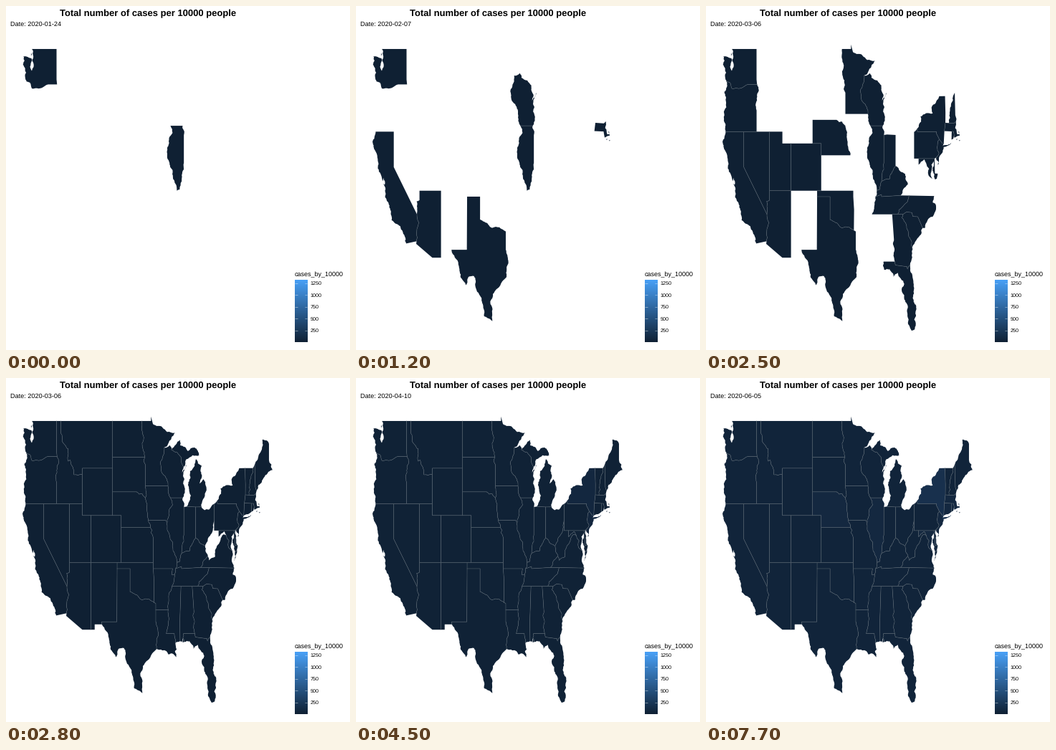
Animation, 480 px wide and 480 px high, one loop 8 s. Source, as a matplotlib script:

```python
import numpy as np
import matplotlib.pyplot as plt
from matplotlib.animation import FuncAnimation
from matplotlib.patches import PathPatch
from matplotlib.path import Path

SIZE, DPI = 480, 72  # at 72 dpi one point is one pixel
FRAMES, STEP = 80, 100
FONT = "Liberation Sans"

LOW = np.array([15, 32, 51]) / 255
WARM = np.array([24, 48, 77]) / 255
HIGH = np.array([72, 160, 247]) / 255
BORDER = "#4c5a66"

rng = np.random.default_rng(3)
edges = []


def project(west, north):
    """Plain longitude and latitude to the pixel plane, as x + iy."""
    return complex(775.1 - 6.02 * west, 867.5 - 16.48 * north)


def fray(a, b, rough):
    """Points after a up to b, by midpoint displacement."""
    if not rough or abs(b - a) < 3:
        return [b]
    mid = (a + b) / 2 + rough * rng.uniform(-1, 1) * 1j * (b - a)
    return fray(a, mid, rough) + fray(mid, b, rough)


def edge(owners, coords, rough):
    """A stretch of boundary, shared by one or two states."""
    keys = [project(w, n) for w, n in zip(coords[::2], coords[1::2])]
    pts = keys[:1]
    for a, b in zip(keys, keys[1:]):
        pts += fray(a, b, rough)
    edges.append((owners.split(), pts))


def line(owners, *coords):
    edge(owners, coords, 0)


def river(owners, *coords):
    edge(owners, coords, 0.12)


def coast(owners, *coords):
    edge(owners, coords, 0.16)


# West
coast("WA", 124, 46.25, 124.1, 47, 124.7, 48.4, 122.75, 48.15, 123, 47.3,
      122.8, 47.15, 122.35, 47.5, 122.5, 48.5, 122.76, 49)
line("WA", 122.76, 49, 117.04, 49)
for w, n in (122.95, 48.6), (122.6, 48.15):
    line("WA", w, n, w - 0.2, n, w, n - 0.2, w, n)
line("WA ID", 117.04, 49, 117.04, 46.42, 116.92, 46)
river("WA OR", 124, 46.25, 123.2, 46.15, 122.75, 45.65, 121.2, 45.65,
      120.5, 45.7, 119, 46)
line("WA OR", 119, 46, 116.92, 46)
river("OR ID", 116.92, 46, 116.5, 45.5, 117.2, 44.4, 117.03, 43.8)
line("OR ID", 117.03, 43.8, 117.03, 42)
coast("OR", 124, 46.25, 124.1, 44.5, 124.55, 42.85, 124.2, 42)
line("OR CA", 124.2, 42, 120, 42)
line("OR NV", 120, 42, 117.03, 42)
coast("CA", 124.2, 42, 124.4, 40.45, 123.8, 39.8, 123.7, 38.9, 122.5, 37.8,
      122.35, 38.1, 122.1, 37.5, 122.5, 37.6, 121.95, 36.6, 120.65, 35.2,
      120.5, 34.5, 118.5, 34, 117.3, 33, 117.12, 32.53)
line("CA", 117.12, 32.53, 114.72, 32.72)
line("CA NV", 120, 42, 120, 39, 114.63, 35)
river("CA AZ", 114.63, 35, 114.15, 34.3, 114.5, 33.9, 114.72, 32.72)
river("NV AZ", 114.63, 35, 114.7, 36.1, 114.04, 36.2)
line("NV AZ", 114.04, 36.2, 114.04, 37)
line("NV ID", 117.03, 42, 114.04, 42)
line("NV UT", 114.04, 42, 114.04, 37)
line("UT ID", 114.04, 42, 111.05, 42)
line("UT WY", 111.05, 42, 111.05, 41, 109.05, 41)
line("UT CO", 109.05, 41, 109.05, 37)
line("UT AZ", 114.04, 37, 109.05, 37)
line("AZ NM", 109.05, 37, 109.05, 31.33)
line("AZ", 114.72, 32.72, 114.8, 32.5, 111.07, 31.33, 109.05, 31.33)
line("ID", 117.04, 49, 116.05, 49)
line("ID MT", 116.05, 49, 116.05, 48)
river("ID MT", 116.05, 48, 114.7, 46.7, 114.35, 46.65, 114.4, 45.6,
      113.9, 45.7, 113, 44.45, 111.05, 44.5)
line("ID WY", 111.05, 44.5, 111.05, 42)

# Mountains and plains
line("MT", 116.05, 49, 104.05, 49)
line("MT WY", 111.05, 44.5, 111.05, 45, 104.05, 45)
line("MT ND", 104.05, 49, 104.05, 45.94)
line("MT SD", 104.05, 45.94, 104.05, 45)
line("WY SD", 104.05, 45, 104.05, 43)
line("WY NE", 104.05, 43, 104.05, 41)
line("WY CO", 109.05, 41, 104.05, 41)
line("CO NE", 104.05, 41, 102.05, 41, 102.05, 40)
line("CO KS", 102.05, 40, 102.05, 37)
line("CO OK", 103, 37, 102.05, 37)
line("CO NM", 109.05, 37, 103, 37)
line("NM OK", 103, 37, 103, 36.5)
line("NM TX", 103, 36.5, 103.06, 32, 106.62, 32, 106.53, 31.78)
line("NM", 109.05, 31.33, 108.2, 31.33, 108.2, 31.78, 106.53, 31.78)
line("ND", 104.05, 49, 97.23, 49)
line("ND SD", 104.05, 45.94, 96.56, 45.94)
river("ND MN", 97.23, 49, 96.85, 47.5, 96.56, 45.94)
river("SD MN", 96.56, 45.94, 96.85, 45.6, 96.45, 45.3)
line("SD MN", 96.45, 45.3, 96.45, 43.5)
river("SD IA", 96.45, 43.5, 96.45, 42.5)
line("SD NE", 104.05, 43, 98.5, 43)
river("SD NE", 98.5, 43, 97.9, 42.8, 97.2, 42.85, 96.45, 42.5)
river("NE IA", 96.45, 42.5, 96.1, 41.7, 95.77, 40.58)
river("NE MO", 95.77, 40.58, 95.3, 40)
line("NE KS", 102.05, 40, 95.3, 40)
river("KS MO", 95.3, 40, 94.9, 39.75, 95.1, 39.5, 94.62, 39.1)
line("KS MO", 94.62, 39.1, 94.62, 37)
line("KS OK", 102.05, 37, 94.62, 37)
line("OK MO", 94.62, 37, 94.62, 36.5)
line("OK AR", 94.62, 36.5, 94.43, 35.4, 94.48, 33.64)
line("OK TX", 103, 36.5, 100, 36.5, 100, 34.56)
river("OK TX", 100, 34.56, 98.1, 34.13, 97.2, 33.85, 95.5, 33.9, 94.48, 33.64)
line("TX AR", 94.48, 33.64, 94.04, 33.55, 94.04, 33.02)
line("TX LA", 94.04, 33.02, 94.04, 32)
river("TX LA", 94.04, 32, 93.55, 31.2, 93.85, 29.7)
river("TX", 106.53, 31.78, 104.9, 30.6, 104.5, 29.65, 103.2, 29, 102.7, 29.7,
      101.4, 29.77, 100.3, 28.3, 99.5, 27.5, 99.1, 26.4, 97.15, 25.95)
coast("TX", 97.15, 25.95, 97.4, 27.3, 97, 28.1, 94.9, 29.3, 93.85, 29.7)

# Midwest
line("MN", 97.23, 49, 95.15, 49, 95.15, 49.38, 94.7, 48.75)
coast("MN", 94.7, 48.75, 92.5, 48.45, 91.4, 48.07, 89.6, 48, 90.8, 47.35,
      92.1, 46.75)
river("MN WI", 92.1, 46.75, 92.3, 46.1, 92.88, 45.6, 92.75, 44.75,
      91.25, 43.85, 91.22, 43.5)
line("MN IA", 96.45, 43.5, 91.22, 43.5)
river("IA WI", 91.22, 43.5, 91.15, 42.9, 90.64, 42.5)
river("IA IL", 90.64, 42.5, 90.15, 41.9, 91.05, 41.2, 91.42, 40.38)
line("IA MO", 95.77, 40.58, 91.73, 40.6, 91.42, 40.38)
river("MO IL", 91.42, 40.38, 91.4, 39.9, 90.7, 39, 90.15, 38.75, 90.2, 38.4,
      89.5, 37.6, 89.15, 37)
river("MO KY", 89.15, 37, 89.45, 36.5)
river("MO TN", 89.45, 36.5, 89.7, 36)
line("MO AR", 94.62, 36.5, 90.15, 36.5, 90.37, 36, 89.7, 36)
coast("WI", 92.1, 46.75, 90.8, 46.95, 90.42, 46.57)
river("WI MI", 90.42, 46.57, 88.1, 45.9, 87.6, 45.1)
coast("WI", 87.6, 45.1, 88, 44.55, 87, 45.3, 87.7, 43.7, 87.8, 42.5)
line("WI IL", 90.64, 42.5, 87.8, 42.5)
coast("IL", 87.8, 42.5, 87.53, 41.72)
line("IL IN", 87.53, 41.72, 87.53, 39.35)
river("IL IN", 87.53, 39.35, 87.55, 38.8, 88.03, 37.8)
river("IL KY", 89.15, 37, 88.5, 37.1, 88.03, 37.8)
coast("IN", 87.53, 41.72, 86.82, 41.76)
line("IN MI", 86.82, 41.76, 84.81, 41.72)
line("IN OH", 84.81, 41.72, 84.82, 39.1)
river("IN KY", 88.03, 37.8, 86.2, 38, 85.4, 38.7, 84.82, 39.1)
coast("MI", 90.42, 46.57, 88.4, 47.4, 88.4, 46.95, 86.6, 46.45, 85, 46.75,
      84, 46.1, 85.5, 46.1, 87, 45.75, 87.6, 45.1)
coast("MI", 86.82, 41.76, 86.25, 43, 86.5, 43.8, 86.1, 44.75, 84.75, 45.77,
      83.4, 45.2, 83.35, 44.3, 83.9, 43.7, 82.95, 44.07, 82.45, 43,
      83.45, 41.73)
line("MI OH", 84.81, 41.72, 83.45, 41.73)
coast("OH", 83.45, 41.73, 82.7, 41.45, 81.7, 41.5, 80.52, 41.98)
line("OH PA", 80.52, 41.98, 80.52, 40.64)
river("OH WV", 80.52, 40.64, 80.7, 40, 81.7, 39.2, 82.6, 38.42)
river("OH KY", 84.82, 39.1, 83.7, 38.63, 82.6, 38.42)

# South
river("KY WV", 82.6, 38.42, 81.97, 37.54)
river("KY VA", 81.97, 37.54, 83.68, 36.6)
line("KY TN", 83.68, 36.6, 88.07, 36.5, 88.07, 36.68, 89.45, 36.5)
river("TN AR", 89.7, 36, 90.3, 35)
line("TN MS", 90.3, 35, 88.2, 35)
line("TN AL", 88.2, 35, 85.6, 35)
line("TN GA", 85.6, 35, 84.32, 35)
river("TN NC", 84.32, 35, 84, 35.4, 82, 36.1, 81.68, 36.59)
line("TN VA", 83.68, 36.6, 81.68, 36.59)
line("AR LA", 94.04, 33.02, 91.17, 33)
river("AR MS", 91.17, 33, 91.1, 33.6, 90.3, 35)
river("LA MS", 91.17, 33, 91, 32.2, 91.6, 31)
line("LA MS", 91.6, 31, 89.75, 31)
river("LA MS", 89.75, 31, 89.5, 30.2)
coast("LA", 93.85, 29.7, 91.8, 29.55, 91.2, 29.25, 89.9, 29.25, 89.3, 29,
      89.6, 29.5, 89.2, 29.65, 89.5, 30.2)
line("MS AL", 88.2, 35, 88.47, 31.9, 88.4, 30.37)
coast("MS", 89.5, 30.2, 88.4, 30.37)
line("AL GA", 85.6, 35, 85.2, 32.9)
river("AL GA", 85.2, 32.9, 85.05, 32, 85, 31)
line("AL FL", 85, 31, 87.6, 31)
river("AL FL", 87.6, 31, 87.45, 30.3)
coast("AL", 88.4, 30.37, 88.05, 30.3, 88, 30.7, 87.8, 30.25, 87.45, 30.3)
line("GA FL", 85, 31, 84.86, 30.7, 82.2, 30.57)
river("GA FL", 82.2, 30.57, 82.05, 30.37, 81.45, 30.7)
line("GA NC", 84.32, 35, 83.1, 35)
river("GA SC", 83.1, 35, 83.35, 34.7, 81.5, 33, 80.9, 32.03)
coast("GA", 80.9, 32.03, 81.45, 30.7)
coast("FL", 87.45, 30.3, 86.2, 30.35, 85.3, 29.7, 84.3, 30.05, 82.8, 29.1,
      82.8, 27.8, 81.8, 26.1, 81.1, 25.15, 80.4, 25.25, 80.05, 26.9,
      80.55, 28.3, 81.45, 30.7)
line("SC NC", 83.1, 35, 82.3, 35.2, 81.05, 35.15, 80.8, 34.82, 79.67, 34.8,
     78.55, 33.86)
coast("SC", 78.55, 33.86, 79.2, 33.2, 80.9, 32.03)
coast("NC", 75.87, 36.55, 76.2, 36, 75.6, 35.9, 75.6, 35.25, 77.4, 34.5,
      77.95, 33.87, 78.55, 33.86)
line("NC VA", 81.68, 36.59, 75.87, 36.55)
river("VA WV", 81.97, 37.54, 81.7, 37.2, 80.3, 37.5, 79.7, 38.5, 78.35, 39.4,
      77.72, 39.32)
coast("VA", 76.3, 38, 76.3, 37, 75.87, 36.55)
coast("VA", 75.65, 37.95, 75.95, 37.15, 75.24, 38.03)

# Northeast
river("VA MD", 77.72, 39.32, 77.05, 38.85, 77.25, 38.4, 76.3, 38)
line("VA MD", 75.65, 37.95, 75.24, 38.03)
coast("MD", 76.3, 38, 76.5, 39.2, 76, 39.5, 76.25, 38.7, 75.65, 37.95)
coast("MD", 75.24, 38.03, 75.05, 38.45)
river("MD WV", 77.72, 39.32, 78.2, 39.65, 79.48, 39.2)
line("MD WV", 79.48, 39.2, 79.48, 39.72)
line("MD PA", 79.48, 39.72, 75.79, 39.72)
line("MD DE", 75.79, 39.72, 75.7, 38.46, 75.05, 38.45)
line("DE PA", 75.79, 39.72, 75.42, 39.8)
coast("DE", 75.42, 39.8, 75.4, 39, 75.05, 38.45)
line("PA WV", 79.48, 39.72, 80.52, 39.72, 80.52, 40.64)
coast("PA", 80.52, 41.98, 79.76, 42.27)
line("PA NY", 79.76, 42.27, 79.76, 42, 75.35, 42)
river("PA NY", 75.35, 42, 74.7, 41.36)
river("PA NJ", 74.7, 41.36, 75.2, 40.65, 74.75, 40.2, 75.42, 39.8)
coast("NJ", 75.42, 39.8, 74.9, 38.95, 74, 40.2, 73.95, 41)
line("NJ NY", 74.7, 41.36, 73.95, 41)
line("NY", 73.95, 41, 73.95, 40.75, 73.65, 41)
coast("NY", 74, 40.6, 72.5, 40.85, 71.9, 41.07, 73.7, 40.85, 74, 40.6)
coast("NY", 79.76, 42.27, 78.9, 42.85, 79.05, 43.27, 76.2, 43.55, 76.3, 44.2,
      74.7, 45)
line("NY", 74.7, 45, 73.35, 45.01)
line("NY CT", 73.65, 41, 73.5, 42.05)
line("NY MA", 73.5, 42.05, 73.27, 42.75)
line("NY VT", 73.27, 42.75, 73.25, 43.6, 73.35, 45.01)
line("VT", 73.35, 45.01, 71.5, 45.01)
river("VT NH", 71.5, 45.01, 72.3, 43.6, 72.46, 42.73)
line("VT MA", 73.27, 42.75, 72.46, 42.73)
line("NH MA", 72.46, 42.73, 71.3, 42.7, 70.82, 42.87)
line("NH", 71.5, 45.01, 71.1, 45.3)
line("NH", 70.7, 43.07, 70.82, 42.87)
line("NH ME", 71.1, 45.3, 70.97, 43.4, 70.7, 43.07)
river("ME", 71.1, 45.3, 70.4, 45.75, 69.25, 47.45, 68.3, 47.35, 67.8, 47.07)
line("ME", 67.8, 47.07, 67.8, 45.7)
coast("ME", 67.8, 45.7, 67, 44.85, 69, 44.2, 70.2, 43.6, 70.7, 43.07)
coast("MA", 70.82, 42.87, 71, 42.3, 70.5, 41.77, 70, 41.8, 70.2, 42.07,
      69.95, 41.67, 71.12, 41.5)
for w, n in (70.8, 41.35), (70.15, 41.25):
    line("MA", w, n, w - 0.3, n + 0.05, w - 0.2, n - 0.05, w, n)
line("MA CT", 73.5, 42.05, 71.8, 42.02)
line("MA RI", 71.8, 42.02, 71.38, 42.02, 71.12, 41.5)
line("CT RI", 71.8, 42.02, 71.85, 41.32)
coast("CT", 73.65, 41, 71.85, 41.32)
coast("RI", 71.85, 41.32, 71.45, 41.4, 71.4, 41.7, 71.12, 41.5)

# Week in which each state joins; all others join in week 7
FIRST = {s: week for week, names in enumerate([
    "WA IL", "CA AZ", "WI MA", "TX", "NE", "OR UT",
    "MN NV CO OK IN KY TN NC SC GA FL PA NY NJ MD NH RI"])
    for s in names.split()}
FIRST["WV"] = 8

EARLY = {"NY": 0.45, "NJ": 0.4}
LATE = {"NY": 1} | dict.fromkeys("IL NE MA NJ RI CT DE MD".split(), 0.5)


def joins(state):
    return FIRST.get(state, 7)


def vertices(pts):
    return np.column_stack([np.real(pts), np.imag(pts)])


def outline(state):
    """Chain the state's edges into closed rings."""
    todo = [pts for owners, pts in edges if state in owners]
    parts = []
    while todo:
        ring = list(todo.pop(0))
        while ring[0] != ring[-1]:
            i = next(i for i, e in enumerate(todo) if ring[-1] in (e[0], e[-1]))
            e = todo.pop(i)
            ring += e[1:] if e[0] == ring[-1] else e[-2::-1]
        parts.append(Path(vertices(ring), closed=True))
    return Path.make_compound_path(*parts)


plt.rcParams["text.hinting"] = "none"
fig = plt.figure(figsize=(SIZE / DPI, SIZE / DPI), dpi=DPI, facecolor="white")
ax = fig.add_axes([0, 0, 1, 1])

shapes = {}
for s in sorted({s for owners, _ in edges for s in owners}):
    shapes[s] = PathPatch(outline(s), lw=0, snap=False)
    ax.add_patch(shapes[s])

borders = []
for owners, pts in edges:
    if len(owners) == 2:
        stroke, = ax.plot(*vertices(pts).T, color=BORDER, lw=0.6, snap=False)
        borders.append((max(map(joins, owners)), stroke))

# Legend
ramp = np.linspace(1, 0, 256)[:, None, None]
ax.imshow(LOW + (HIGH - LOW) * ramp, extent=(403, 420.3, 468.6, 382.2),
          aspect="auto")
for i in range(5):
    y = 452.5 - 16.5 * i
    for x in (403, 416.8):
        ax.plot([x, x + 3.5], [y, y], color="white", lw=0.5, alpha=0.8,
                solid_capstyle="butt")
    ax.text(424.5, y + 2.6, str(250 * (i + 1)), family=FONT, size=7.2)
ax.text(402.7, 377, "cases_by_10000", family=FONT, size=9.05)

ax.text(198, 14, "Total number of cases per 10000 people", family=FONT,
        size=13.05, weight="bold", ha="center")
date = ax.text(5.7, 28, "", family=FONT, size=9.1)

ax.set(xlim=(0, SIZE), ylim=(SIZE, 0))
ax.axis("off")

START = np.datetime64("2020-01-24")


def ramp_up(frame, start, end):
    return float(np.clip((frame - start) / (end - start), 0, 1))


def update(frame):
    week = frame // 4
    label = max(0, (frame - 1) // 4)  # the date lags the map by one step
    date.set_text(f"Date: {START + 7 * label}")
    rise, late = ramp_up(frame, 39, 43), ramp_up(frame, 72, 76)
    for s, shape in shapes.items():
        early = EARLY.get(s, 0.1)
        heat = early * rise + (LATE.get(s, 0.25) - early) * late
        shape.set_facecolor(LOW + (WARM - LOW) * heat)
        shape.set_visible(joins(s) <= week)
    for first, stroke in borders:
        stroke.set_visible(first <= week)
    return []


anim = FuncAnimation(fig, update, frames=FRAMES, interval=STEP, repeat=True,
                     repeat_delay=0, blit=False)
plt.show()
```
